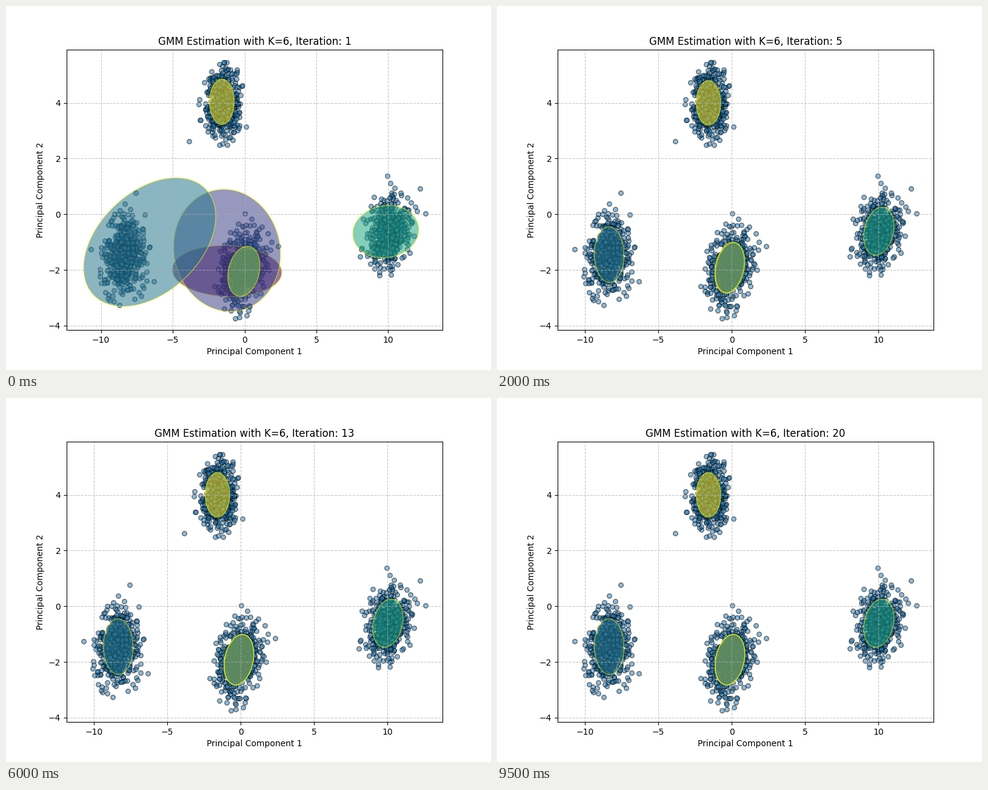
These frames come from a looping animation (800x600 px, 10 s). A matplotlib script:

```python
import numpy as np
import matplotlib.pyplot as plt
from matplotlib.animation import FuncAnimation
from matplotlib.patches import Polygon

K = 6
ITERATIONS = 20
POINTS_PER_CLUSTER = 500
MAX_RADIUS = 2.9  # in standard deviations

# Gaussian: centre x, centre y, half width, half height, correlation
LEFT = (-8.35, -1.45, 1.01, 1.00, -0.02)
MIDDLE = (-0.12, -1.92, 1.01, 0.905, 0.23)
RIGHT = (10.03, -0.61, 1.03, 0.865, 0.22)
TOP = (-1.585, 4.00, 0.835, 0.80, 0.0)

INITIAL = [
    (-1.23, -2.04, 3.82, 0.915, -0.06),
    (-1.22, -1.30, 3.72, 2.195, -0.06),
    (-6.61, -1.00, 4.60, 2.31, 0.40),
    (9.83, -0.625, 2.30, 0.94, 0.08),
    (-0.05, -2.05, 1.12, 0.90, 0.22),
    (-1.58, 4.04, 0.857, 0.817, 0.0),
]
FITTED = np.array([MIDDLE, MIDDLE, LEFT, RIGHT, MIDDLE, TOP])

# Three components share the middle cluster and merge: shift x, y, half width
SPREAD = np.zeros_like(FITTED)
SPREAD[[0, 1, 4], :3] = (-0.35, -0.12, -0.14), (-0.27, 0.14, -0.14), (0.14, -0.01, -0.06)

# The most isolated points, which set the extent of the data
STRAYS = [(-10.71, -1.25), (-7.57, 0.77), (-6.33, -2.41), (-3.86, 2.62),
          (-1.46, 5.455), (0.11, 3.15), (0.03, 0.03), (2.34, -1.15),
          (-0.34, -3.69), (9.95, 1.38), (12.22, 0.92), (12.59, 0.03)]


def shape(gaussian, u, v):
    """Map unit-circle coordinates onto a correlated Gaussian."""
    cx, cy, half_w, half_h, rho = gaussian
    x = cx + half_w * u
    y = cy + half_h * (rho * u + np.sqrt(1 - rho ** 2) * v)
    return np.column_stack([x, y])


def sample(gaussian, rng):
    z = rng.standard_normal((2 * POINTS_PER_CLUSTER, 2))
    z = z[np.hypot(*z.T) < MAX_RADIUS][:POINTS_PER_CLUSTER]
    # Ellipses are drawn at sqrt(2) standard deviations.
    return shape(gaussian, *(z / np.sqrt(2)).T)


def gaussians_at(step):
    if step == 0:
        return INITIAL
    return FITTED + SPREAD * np.exp(-0.45 * (step - 1) ** 1.5)


rng = np.random.default_rng(42)
points = np.vstack([sample(g, rng) for g in (LEFT, MIDDLE, RIGHT, TOP)] + [STRAYS])

fig, ax = plt.subplots(figsize=(8, 6), dpi=100)
ax.scatter(*points.T, s=30, alpha=0.5, edgecolors="k")
ax.set_ylim(-4.156, 5.910)
ax.set_xlabel("Principal Component 1")
ax.set_ylabel("Principal Component 2")
ax.grid(True, linestyle="--", alpha=0.7)
title = ax.set_title("")

angle = np.linspace(0, 2 * np.pi, 181)
circle = np.cos(angle), np.sin(angle)
ellipses = [
    ax.add_patch(Polygon(np.column_stack(circle), facecolor=color,
                         edgecolor="yellow", alpha=0.55))
    for color in plt.cm.viridis(np.linspace(0, 1, K))
]


def update(step):
    for ellipse, gaussian in zip(ellipses, gaussians_at(step)):
        ellipse.set_xy(shape(gaussian, *circle))
    # The wide initial ellipses push the left limit outwards.
    ax.set_xlim(*((-12.39, 13.78) if step == 0 else (-11.863, 13.75)))
    title.set_text(f"GMM Estimation with K={K}, Iteration: {step + 1}")
    return [*ellipses, title]


anim = FuncAnimation(fig, update, frames=ITERATIONS, interval=500,
                     repeat=True, repeat_delay=0, blit=False)
plt.show()
```
